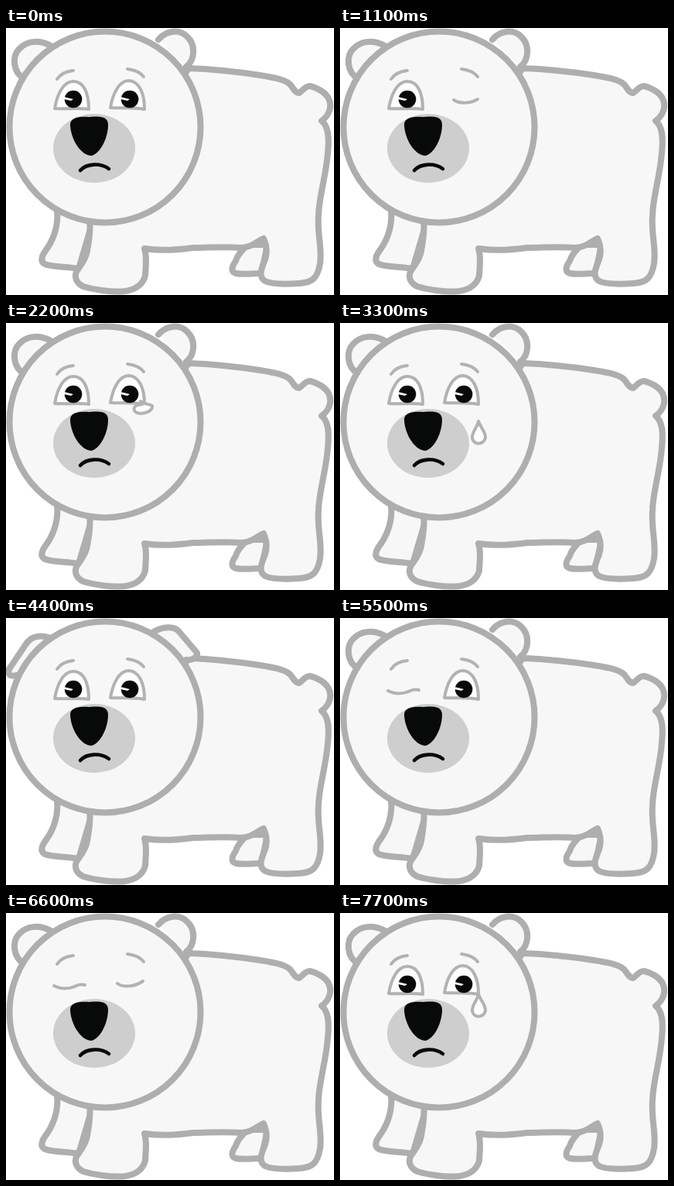
Write an HTML page that moves like this. It is 424 by 345 pixels and loops after 8000 ms.

```html
<!DOCTYPE html>
<html lang="en">
<head>
<meta charset="utf-8">
<title>Sad bear</title>
<style>
  html, body { margin: 0; width: 100%; height: 100%; overflow: hidden; background: #fff; }
  svg { display: block; width: 100%; height: 100%; }
  .line { fill: #f7f7f7; stroke: #aeaeae; stroke-width: 8; stroke-linejoin: round; stroke-linecap: round; }
  .thin { fill: none; stroke: #b2b2b2; stroke-width: 4; stroke-linejoin: round; stroke-linecap: round; }
  .white { fill: #fdfdfd; }
  .ink { fill: #080a09; }
</style>
</head>
<body>
<svg viewBox="0 0 424 345">
  <g class="line">
    <path d="M66 236C68 254 62 272 53 285C47 293 43 301 50 305C60 309 78 308 94 311L112 250Z"/>
    <path d="M312 280C305 288 299 293 297 301C292 308 290 315 297 317C307 319 319 317 330 317L338 280Z"/>
    <path d="M236 52C266 53 302 57 328 61C347 64 364 67 369 75C373 81 375 84 379 84C383 82 386 75 393 75C402 77 413 83 417 91C422 101 418 113 408 120C417 127 418 142 416 161C414 190 405 216 404 241C402 267 409 285 406 304C403 323 396 329 379 330C364 331 343 331 335 327C325 321 331 309 335 299C338 290 337 281 333 272C323 276 319 283 304 284C282 282 262 284 242 284C220 287 197 288 179 285C183 298 180 311 180 320C177 331 168 338 154 340C137 342 113 338 100 334C91 330 88 322 91 315C96 307 103 300 105 288C107 275 110 264 108 246Z"/>
  </g>
  <g class="line">
    <path id="earL"/>
    <path id="earR"/>
    <circle cx="128" cy="128" r="123.5"/>
  </g>
  <path class="thin" d="M66 66C70 60 77 56 87 55M157 53C166 54 174 58 178 63"/>
  <ellipse cx="114" cy="155.5" rx="53" ry="44.5" fill="#cecece"/>
  <path class="ink" d="M83 124C84 115 96 114 108 115C121 114 132 114 132 125C132 141 123 161 111 165C96 165 83 142 83 124Z"/>
  <path d="M96 184C104 175 122 174 133 182" fill="none" stroke="#080a09" stroke-width="4.6" stroke-linecap="round"/>
  <g id="openL">
    <path class="thin white" d="M63 104C66 86 74 69 87 69C100 69 107 83 107 105C93 103 78 105 63 104Z"/>
    <circle class="ink" cx="87" cy="92" r="11.3"/>
    <path d="M75 89L87 92L84 94L75 92Z" fill="#fdfdfd"/>
  </g>
  <g id="openR">
    <path class="thin white" d="M135 103C138 85 146 68 159 68C172 69 179 84 179 105C165 102 150 104 135 103Z"/>
    <circle class="ink" cx="160" cy="92" r="11.3"/>
    <path d="M148 89L160 92L157 94L148 92Z" fill="#fdfdfd"/>
  </g>
  <path id="shutL" class="thin" d="M62 94C71 99 83 98 91 94C95 92 98 92 102 93"/>
  <path id="shutR" class="thin"/>
  <path id="tear" class="thin white"/>
</svg>
<script>
const STEP = 550, LOOP = 8000;

const ears = {
  up: ["M24 66C8 57 8 36 17 27C27 16 44 15 58 23", "M197 15C207 3 224 1 234 11C246 22 244 42 233 50"],
  down: ["M58 26C44 21 33 24 27 32L4 66C2 74 6 76 14 74", "M192 17C204 11 218 10 224 18L247 45C248 51 240 55 233 54"]
};
const lid = {
  wink: "M147 93C155 98 168 98 178 92",
  rest: "M144 91C152 97 167 95 177 88"
};
const drop = {
  small: "M174 101C178 105 184 104 189 107C190 113 181 117 174 117C164 116 163 109 170 106L176 105Z",
  full: "M179 105C177 114 170 119 171 127C173 136 186 136 188 126C188 118 182 114 179 105Z"
};

// One pose per step, repeated
const poses = [
  {},
  { left: true },
  { right: "wink" },
  { left: true, right: "rest" },
  { tear: "small" },
  { tear: "full" },
  { tear: "full", fall: 22 },
  {},
  { ears: "down" }
];

const $ = id => document.getElementById(id);
const show = (id, on) => $(id).setAttribute("display", on ? "inline" : "none");
const shape = (id, d) => $(id).setAttribute("d", d);

function draw(time) {
  const pose = poses[Math.floor((time % LOOP) / STEP) % poses.length];
  const [left, right] = ears[pose.ears || "up"];
  shape("earL", left);
  shape("earR", right);
  show("openL", !pose.left);
  show("shutL", pose.left);
  show("openR", !pose.right);
  shape("shutR", lid[pose.right] || "");
  shape("tear", drop[pose.tear] || "");
  $("tear").setAttribute("transform", `translate(0 ${pose.fall || 0})`);
}

const start = performance.now();
function tick() {
  draw(performance.now() - start);
  requestAnimationFrame(tick);
}
tick();
</script>
</body>
</html>
```
